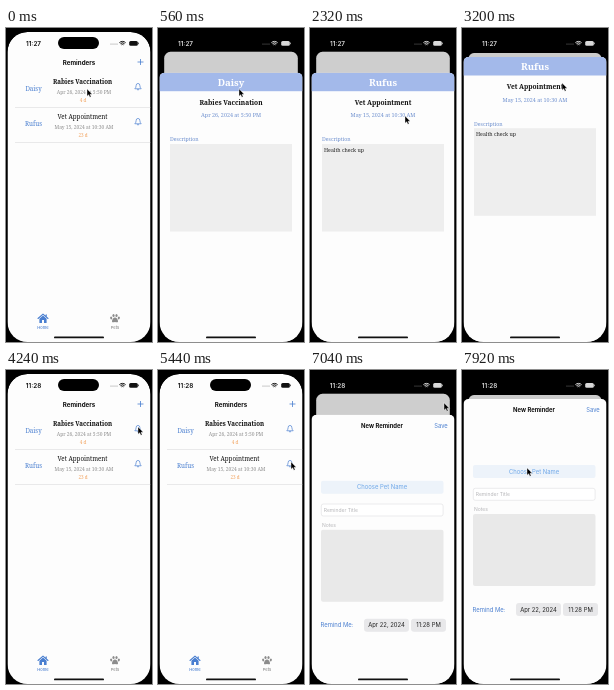
Write an HTML page with a canvas that moves like this. It is 146 by 314 pixels and loops after 8000 ms.

```html
<!DOCTYPE html>
<html lang="en">
<head>
<meta charset="utf-8">
<title>Pet reminders</title>
<style>
html, body { margin: 0; width: 100%; height: 100%; overflow: hidden; background: #000; }
canvas { display: block; width: 146px; height: 314px; }
</style>
</head>
<body>
<canvas id="stage"></canvas>
<script>
const W = 146, H = 314, LOOP = 8000, TOP = 29;
const SANS = 'Inter, "Liberation Sans", sans-serif';
const SLAB = '"Noto Serif", "Liberation Serif", serif';
const BLUE = '#4a7fd0', SOFT = '#6d8fce', GREY = '#8c8c8c', ORANGE = '#f2a05a';

const canvas = document.getElementById('stage');
const ctx = canvas.getContext('2d');
const dpr = window.devicePixelRatio || 1;
canvas.width = W * dpr;
canvas.height = H * dpr;

const rows = [
  { y: 45, pet: 'Daisy', title: 'Rabies Vaccination', weight: 700, date: 'Apr 26, 2024 at 5:50 PM', left: '4 d', note: '' },
  { y: 80, pet: 'Rufus', title: 'Vet Appointment', weight: 400, date: 'May 15, 2024 at 10:30 AM', left: '23 d', note: 'Health check up' }
];

// Pointer stops: time, x, y
const path = [
  [0, 81, 61], [1160, 81, 61], [1380, 84, 170], [1680, 84, 170],
  [1980, 95, 88], [2940, 95, 88], [3040, 100, 55], [3210, 100, 55],
  [3440, 102, 168], [3640, 102, 168], [4000, 91, 82], [4080, 91, 82],
  [4220, 132, 57], [5040, 132, 57], [5420, 133, 92], [5640, 133, 92],
  [6380, 133, 38], [6480, 133, 38], [6620, 134, 33], [7060, 134, 33],
  [7580, 65, 98], [LOOP, 65, 98]
];

// Sheets: opening time, start of the drag, release
const sheets = [
  { open: 315, drag: 1160, drop: 1330, draw: () => detail(rows[0]) },
  { open: 2075, drag: 3210, drop: 3400, draw: () => detail(rows[1]) },
  { open: 6795, drag: Infinity, drop: Infinity, draw: form }
];

const clamp = v => Math.max(0, Math.min(1, v));
const ease = v => v * v * (3 - 2 * v);
const spring = (ms, w) => ms <= 0 ? 1 : (1 + w * ms / 1000) * Math.exp(-w * ms / 1000);

function pointer(t) {
  let i = 1;
  while (i < path.length - 1 && t > path[i][0]) i++;
  const [t0, x0, y0] = path[i - 1], [t1, x1, y1] = path[i];
  const k = ease(clamp((t - t0) / (t1 - t0)));
  return [x0 + (x1 - x0) * k, y0 + (y1 - y0) * k];
}

function sheetTop(s, t) {
  const travel = H - TOP;
  if (t < s.drag) return TOP + travel * spring(t - s.open, 18.8);
  const pull = at => TOP + pointer(at)[1] - pointer(s.drag)[1];
  if (t < s.drop) return pull(t);
  const from = pull(s.drop);
  return H + 2 - (H + 2 - from) * spring(t - s.drop, 28);
}

function text(str, x, y, size, color, { font = SANS, weight = 400, align = 'center' } = {}) {
  ctx.font = `${weight} ${size}px ${font}`;
  ctx.fillStyle = color;
  ctx.textAlign = align;
  ctx.textBaseline = 'alphabetic';
  ctx.fillText(str, x, y);
}

function box(x, y, w, h, r, color, stroke) {
  ctx.beginPath();
  ctx.roundRect(x, y, w, h, r);
  if (color) { ctx.fillStyle = color; ctx.fill(); }
  if (stroke) { ctx.strokeStyle = stroke; ctx.lineWidth = 0.6; ctx.stroke(); }
}

function dot(x, y, rx, ry = rx, turn = 0) {
  ctx.beginPath();
  ctx.ellipse(x, y, rx, ry, turn, 0, 7);
  ctx.fill();
}

function shape(d, x, y, { fill, stroke, width = 0.8 }) {
  const p = new Path2D(d);
  ctx.save();
  ctx.translate(x, y);
  if (fill) { ctx.fillStyle = fill; ctx.fill(p); }
  if (stroke) {
    ctx.strokeStyle = stroke;
    ctx.lineWidth = width;
    ctx.lineJoin = ctx.lineCap = 'round';
    ctx.stroke(p);
  }
  ctx.restore();
}

function bell(x, y) {
  shape('M-2.9 2Q-1.9 1-1.9-.8Q-1.9-3 0-3.1Q1.9-3 1.9-.8Q1.9 1 2.9 2ZM-.8 3.2Q0 4 .8 3.2', x, y, { stroke: BLUE, width: 0.7 });
}

function paw(x, y) {
  ctx.fillStyle = GREY;
  dot(x - 1.5, y - 3, 1.1, 1.6);
  dot(x + 1.5, y - 3, 1.1, 1.6);
  dot(x - 3.8, y - 0.5, 1, 1.4, -0.4);
  dot(x + 3.8, y - 0.5, 1, 1.4, 0.4);
  shape('M0-.9C1.6-.9 3 1.2 3 2.7C3 4.6 1.2 3.6 0 3.6S-3 4.6-3 2.7C-3 1.2-1.6-.9 0-.9Z', x, y, { fill: GREY });
}

function house(x, y) {
  shape('M-5 0L0-4.4L5 0M3.2-3.8V-2', x, y, { stroke: BLUE, width: 1.1 });
  shape('M-3.6.2L0-2.9L3.6.2V4.4H1V1.5H-1V4.4H-3.6Z', x, y, { fill: BLUE });
}

function rule(y) {
  ctx.fillStyle = '#dcdcde';
  ctx.fillRect(9, y, 136, 0.6);
}

function home(t) {
  ctx.fillStyle = '#fdfdfd';
  ctx.fillRect(0, 0, W, H);
  text('Reminders', 73, 36.5, 6.2, '#111', { weight: 700 });
  ctx.globalAlpha = t > 6580 && t < 7000 ? 0.15 : 1;
  shape('M-2.6 0H2.6M0-2.6V2.6', 134.5, 34, { stroke: BLUE, width: 0.8 });
  ctx.globalAlpha = 1;
  for (const r of rows) {
    text(r.pet, 27.5, r.y + 17.5, 6.2, BLUE, { font: SLAB });
    text(r.title, 76.5, r.y + 11.3, 6.2, '#111', { font: SLAB, weight: r.weight });
    text(r.date, 78, r.y + 20.7, 4.9, GREY, { font: SLAB });
    text(r.left, 77, r.y + 29.3, 4.6, ORANGE, { font: SLAB });
    bell(132, r.y + 13.5);
    rule(r.y + 34.3);
  }
  house(37, 290.5);
  text('Home', 37, 300.5, 4, BLUE, { weight: 500 });
  paw(109, 290.5);
  text('Pets', 109, 300.5, 4, GREY, { weight: 500 });
}

// Sheet contents use their resting position
function detail(r) {
  ctx.fillStyle = '#a3b9ea';
  ctx.fillRect(0, TOP, W, 18.5);
  text(r.pet, 73, 42.2, 9.6, '#fff', { font: SLAB, weight: 700 });
  text(r.title, 73, 61, 6.6, '#111', { font: SLAB, weight: 700 });
  text(r.date, 73, 73.7, 5.4, SOFT, { font: SLAB });
  text('Description', 12, 97.5, 5.2, SOFT, { font: SLAB, align: 'left' });
  box(12, 100.3, 122, 87.5, 0, '#eeeeee');
  text(r.note, 14, 108.3, 5.2, '#222', { font: SLAB, align: 'left' });
}

function form(t) {
  const left = { align: 'left' };
  text('New Reminder', 72, 42.2, 5.9, '#111', { weight: 700 });
  text('Save', 131, 42.2, 5.8, BLUE);
  box(11, 95, 122.5, 13, 2, '#edf3fa');
  const pressed = t > 7680 && t < 7840;
  text('Choose Pet Name', 72, 103.6, 5.9, pressed ? '#bcd5f2' : '#6ca6e8');
  box(11.3, 118.3, 121.8, 12, 2, '#fff', '#dedee0');
  text('Reminder Title', 13.8, 126.2, 5, '#b5b5b8', left);
  text('Notes', 12, 141.2, 5, '#b5b5b8', left);
  box(11, 144, 122.5, 72, 2, '#e9e9e9');
  text('Remind Me:', 10.5, 241.7, 5.9, BLUE, left);
  box(54, 233, 45, 13, 3, '#e8e8ea');
  text('Apr 22, 2024', 76.5, 241.7, 5.9, '#222');
  box(101, 233, 35, 13, 3, '#e8e8ea');
  text('11:28 PM', 118.5, 241.7, 5.9, '#222');
}

function status(t, dark) {
  const ink = dark ? '#d8d8d8' : '#111';
  text(t < 3560 ? '11:27' : '11:28', 27.5, 17.6, 6.4, ink, { weight: 600 });
  box(52, 9, 41, 12, 6, '#000');
  ctx.fillStyle = dark ? '#777' : '#888';
  for (let i = 0; i < 4; i++) dot(105 + i * 2, 16, 0.6);
  for (const r of [1.4, 2.9, 4.4]) {
    ctx.beginPath();
    ctx.arc(116.5, 17.8, r, -Math.PI * 0.75, -Math.PI * 0.25);
    ctx.strokeStyle = ink;
    ctx.lineWidth = 1;
    ctx.stroke();
  }
  box(123.2, 13, 8.6, 4.8, 1.5, ink);
  ctx.fillRect(132.2, 14.6, 0.7, 1.6);
}

function draw(t) {
  ctx.setTransform(dpr, 0, 0, dpr, 0, 0);
  ctx.fillStyle = '#000';
  ctx.fillRect(0, 0, W, H);
  ctx.save();
  ctx.beginPath();
  ctx.roundRect(1.5, 4, 143, 310, 20);
  ctx.clip();

  const sheet = sheets.find(s => t >= s.open && t < s.drop + 500);
  const top = sheet ? sheetTop(sheet, t) : H + 2;
  const p = clamp((H - top) / (H - TOP));

  // The list shrinks to a dimmed card behind the sheet
  const scale = 1 - 0.07 * p;
  ctx.save();
  ctx.translate(73, 4 + 21 * p);
  ctx.scale(scale, scale);
  ctx.translate(-73, -4);
  ctx.beginPath();
  ctx.roundRect(1.5, 4, 143, 312, 20 - 14 * p);
  ctx.clip();
  home(t);
  ctx.fillStyle = `rgba(0,0,0,${0.2 * p})`;
  ctx.fillRect(0, 0, W, H + 4);
  ctx.restore();

  if (top < H) {
    ctx.save();
    ctx.translate(0, top - TOP);
    ctx.beginPath();
    ctx.roundRect(1.5, TOP, 143, H, 5);
    ctx.clip();
    ctx.fillStyle = '#fdfdfd';
    ctx.fillRect(0, TOP, W, H);
    sheet.draw(t);
    ctx.restore();
  }
  status(t, p > 0.4);
  box(48, 308.5, 50, 1.8, 0.9, '#111');
  ctx.restore();

  const [x, y] = pointer(t);
  shape('M0 0V7.2L1.7 5.7L2.9 8.3L4.1 7.8L3 5.2H5.2Z', x, y, { fill: '#000', stroke: '#fff', width: 0.4 });
}

function tick() {
  draw(performance.now() % LOOP);
  requestAnimationFrame(tick);
}
tick();
</script>
</body>
</html>
```
